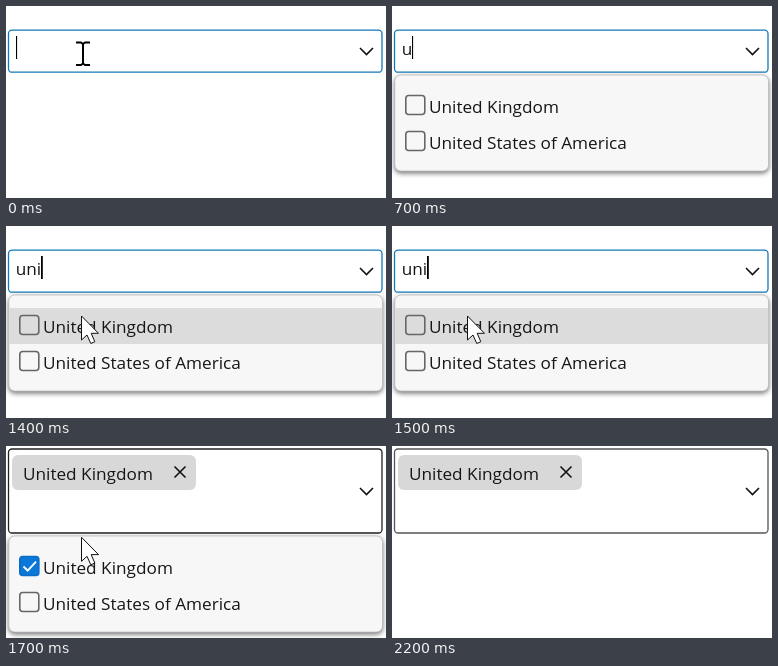
Write an HTML page that moves like this. It is 380 px wide and 192 px high and loops after 2.3 s.

```html
<!DOCTYPE html>
<html lang="en">
<head>
<meta charset="utf-8">
<title>Filterable multi-select</title>
<style>
html, body { margin: 0; width: 100%; height: 100%; overflow: hidden; background: #fff; }
svg { display: block; width: 380px; height: 192px; }
text { font: 17.2px "Open Sans", "Noto Sans", sans-serif; fill: #161616; white-space: pre; }
.line { fill: none; stroke: #111; stroke-width: 1.6; }
#panel { fill: #f7f7f7; stroke: #bbb; stroke-width: .8; filter: drop-shadow(0 2px 2.5px rgba(0, 0, 0, .55)); }
.check { fill: none; stroke: #666; stroke-width: 1.6; }
.check.on { fill: #0a78d8; stroke: #0a6cc4; }
</style>
</head>
<body>
<svg viewBox="0 0 380 192">
  <rect id="field" x="2.5" width="373.5" rx="3.5" fill="#fff" stroke-width="1.3"/>
  <g id="chip">
    <rect x="6" y="9" width="184" height="35" rx="6" fill="#d8d8d8"/>
    <text x="17" y="34">United Kingdom</text>
    <path class="line" d="M168.5 20.5l11 11m0-11l-11 11"/>
  </g>
  <path class="line" d="M354 42l6.5 6.5L367 42"/>
  <text id="typed" x="9.7" y="49"></text>
  <rect id="caret" y="30" height="23"/>
  <g id="popup">
    <rect id="panel" x="2.8" y="69" width="373.7" height="96" rx="6"/>
    <rect id="row" x="3.2" y="82" width="373" height="36"/>
    <rect id="box" class="check" x="13.8" y="89.5" width="19" height="19" rx="3"/>
    <path id="tick" d="M17.5 99.5l4.2 4.2 8.3-9" fill="none" stroke="#fff" stroke-width="1.8"/>
    <rect class="check" x="13.8" y="125.5" width="19" height="19" rx="3"/>
    <text x="37" y="106.5">United Kingdom</text>
    <text x="37" y="142.5">United States of America</text>
  </g>
  <path id="beam" d="M70 36.5h5l2 1.5 2-1.5h5M77 37v21M70 59h5l2-1.5 2 1.5h5" fill="none" stroke="#000" stroke-width="2"/>
  <path id="arrow" d="M0 0V24L5.5 19 9.3 27.5 13.3 25.7 9.7 17.3H17Z" fill="#fff" stroke="#111"/>
</svg>
<script>
const LOOP = 2300;
const $ = id => document.getElementById(id);
const set = (id, attrs) => {
  for (const key in attrs) $(id).setAttribute(key, attrs[key]);
};
const show = (id, on) => set(id, { opacity: +on });

function draw(t) {
  const during = (from, to) => t >= from && t < to;
  const picked = t >= 1700, pressed = during(1600, 1700);
  const typing = t < 1600;

  const border = typing ? '#1478b8' : t < 2100 ? '#222' : '#555';
  set('field', { y: picked ? 3 : 24.2, height: picked ? 84 : 42, stroke: border });
  show('chip', picked);

  const count = !during(400, 1600) ? 0 : t < 1100 ? 1 : t < 1200 ? 2 : 3;
  $('typed').textContent = 'uni'.slice(0, count);
  set('caret', { x: [10, 20, 30.3, 35][count], width: count > 1 ? 1.8 : 1.1 });
  show('caret', typing);

  const shift = picked ? 21 : pressed ? 12 : 0;
  set('popup', {
    transform: `translate(0 ${shift})`,
    opacity: during(700, 2100) ? 1 : during(2100, 2200) ? .5 : 0
  });
  set('row', { fill: pressed ? '#88c3ea' : '#dcdcdc' });
  show('row', during(1300, 1700));
  set('box', { class: picked ? 'check on' : 'check' });
  show('tick', picked);

  show('beam', t < 400);
  set('arrow', { transform: `translate(75.5 ${typing ? 90 : 91.3})` });
  show('arrow', during(1300, 1900));
}

const start = performance.now();
function tick() {
  draw((performance.now() - start) % LOOP);
  requestAnimationFrame(tick);
}
tick();
</script>
</body>
</html>
```
